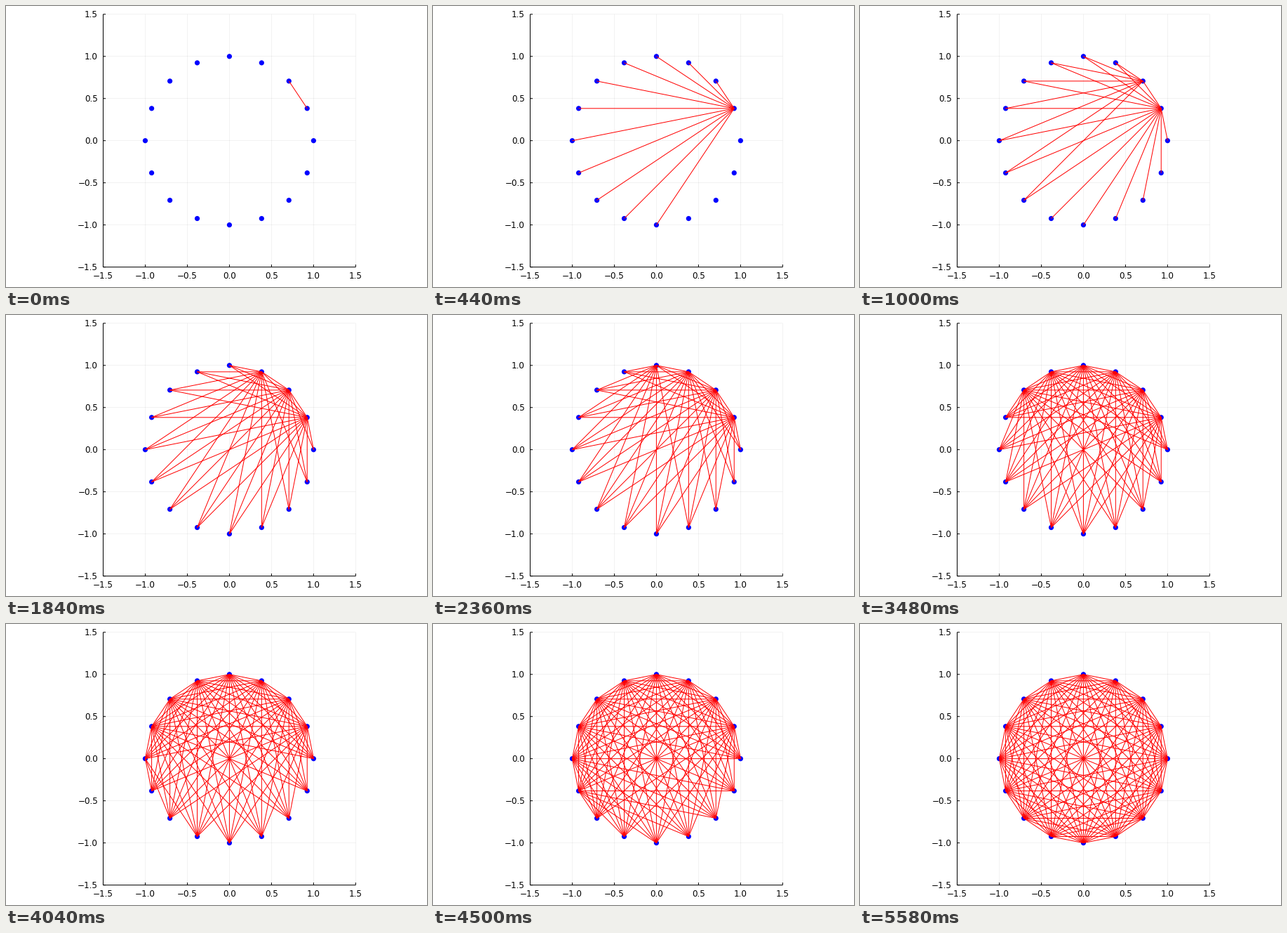
Write a matplotlib script that moves like this. It is 600 by 400 pixels and loops after 5680 ms.

```python
from itertools import combinations

import matplotlib.pyplot as plt
import numpy as np
from matplotlib.animation import FuncAnimation
from matplotlib.collections import LineCollection
from matplotlib.patches import Circle

W, H, DPI = 600, 400, 100
PX = 72 / DPI              # one pixel in points
CX, CY, UNIT = 318.4, 191.7, 119.95
LOOP, STEP = 5680, 20      # ms
N = 16

plt.rcParams["font.family"] = "DejaVu Sans"
fig = plt.figure(figsize=(W / DPI, H / DPI), dpi=DPI, facecolor="white")
ax = fig.add_axes([0, 0, 1, 1])
ax.set_xlim(0, W)
ax.set_ylim(H, 0)
ax.axis("off")


def to_px(x, y):
    return CX + UNIT * x, CY - UNIT * y


def add_lines(segments, color, width, z, **kw):
    lines = LineCollection(segments, colors=color, linewidths=width * PX,
                           zorder=z, **kw)
    lines.set_snap(False)
    ax.add_collection(lines, autolim=False)
    return lines


def draw_axes():
    left, top = to_px(-1.5, 1.5)
    right, bottom = to_px(1.5, -1.5)
    tick = 3.6
    grid = []
    frame = [[(left, top), (left, bottom)], [(left, bottom), (right, bottom)]]
    for v in np.arange(-1.5, 1.6, 0.5):
        x, y = to_px(v, v)
        grid += [[(x, top), (x, bottom)], [(left, y), (right, y)]]
        frame += [[(x, bottom), (x, bottom - tick)],
                  [(left, y), (left + tick, y)]]
        label = f"{v:.1f}".replace("-", "\u2212")
        ax.text(x, 388, label, size=12 * PX, ha="center", va="baseline")
        ax.text(131, y + 4.4, label, size=12 * PX, ha="right", va="baseline")
    add_lines(grid, "black", 0.5, 1, alpha=0.1)
    add_lines(frame, "black", 1, 2)


draw_axes()
angles = 2 * np.pi * np.arange(1, N + 1) / N
points = [to_px(np.cos(a), np.sin(a)) for a in angles]
for p in points:
    ax.add_patch(Circle(p, 3.6, color="blue", linewidth=0, zorder=3))

chords = list(combinations(points, 2))
web = add_lines(chords[:1], "red", 1, 4)


def chord_count(t):
    # three chords per 140 ms, held for 20, 100 and 20 ms
    cycle, phase = divmod(t, 140)
    return min(3 * cycle + 1 + (phase >= 20) + (phase >= 120), len(chords))


def update(i):
    web.set_segments(chords[:chord_count(i * STEP)])
    return [web]


anim = FuncAnimation(fig, update, frames=LOOP // STEP, interval=STEP,
                     repeat=True, repeat_delay=0, blit=False)
plt.show()
```
